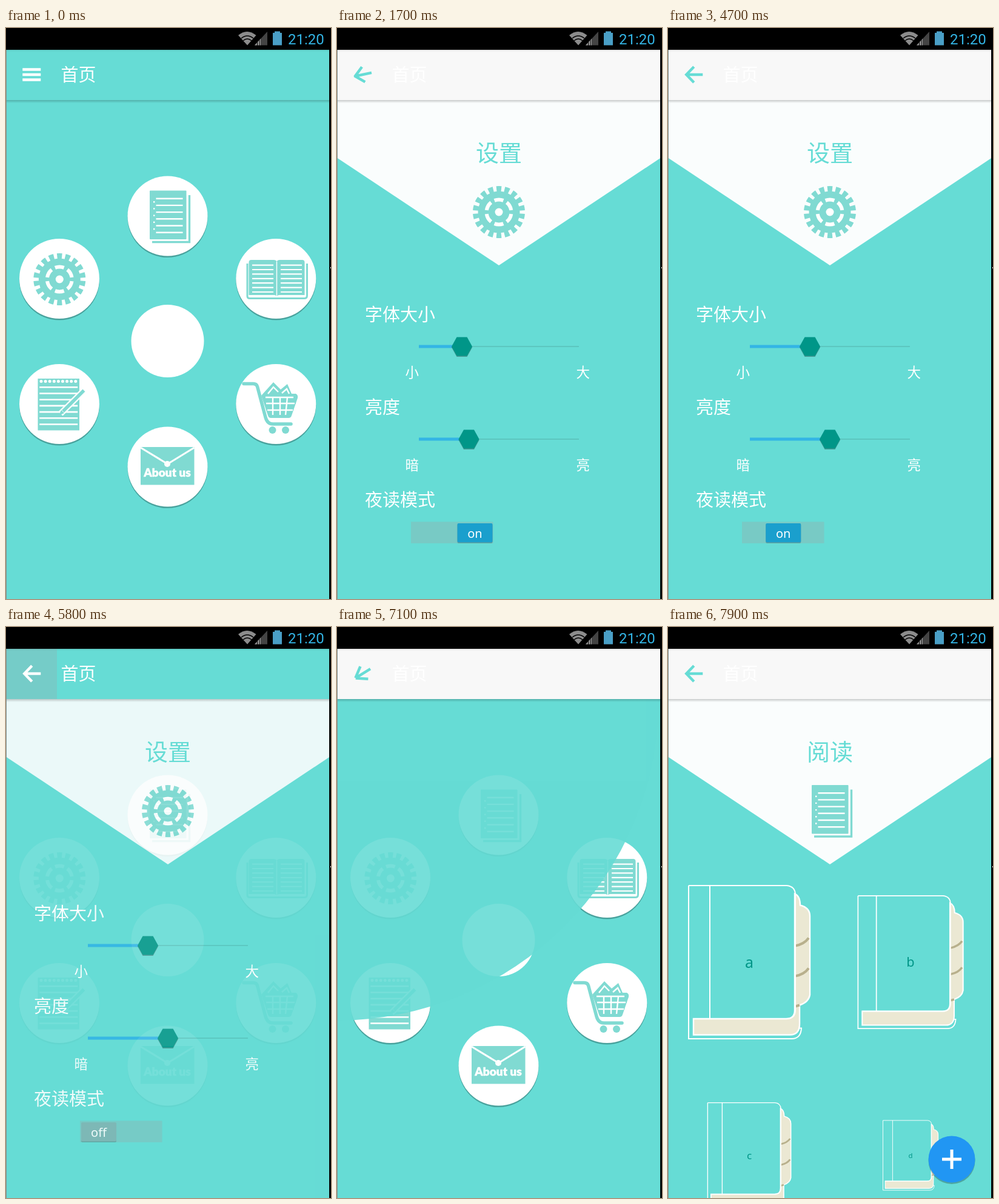
An HTML page that plays this animation: 536 px wide and 943 px high, repeating every 8 s.

```html
<!DOCTYPE html>
<html lang="zh-CN">
<head>
<meta charset="utf-8">
<title>Reader menu</title>
<style>
  html, body { margin: 0; width: 100%; height: 100%; overflow: hidden; background: #000; }
  svg { display: block; width: 100%; height: 100%; }
  text { font-family: "Noto Sans CJK SC", "Noto Sans CJK", sans-serif; fill: #fff; }
  .latin { font-family: "Noto Sans", "Open Sans", sans-serif; text-anchor: middle; }
  .label { font-size: 29px; }
  .small { font-size: 22.5px; }
  .heading { font-size: 38px; fill: #66dcd5; }
  .bg { fill: #66dcd5; }
  .ink { fill: #80dad2; }
  .ink-line { fill: none; stroke: #80dad2; }
  .white-line { fill: none; stroke: #fff; }
</style>
</head>
<body>
<svg viewBox="0 0 536 943" preserveAspectRatio="none">
  <defs>
    <linearGradient id="shade" x2="0" y2="1">
      <stop stop-color="#000" stop-opacity=".2"/>
      <stop offset="1" stop-color="#000" stop-opacity="0"/>
    </linearGradient>
    <clipPath id="reveal"><circle id="revealDisc" cx="0" cy="119"/></clipPath>

    <rect id="page" class="bg" x="1" y="36" width="532" height="907"/>
    <path id="banner" d="M1 119H533V215L267 392L1 215Z" fill="#fafdfd"/>
    <path id="hexagon" d="M-17 0L-8.5-15.5H8.5L17 0L8.5 15.5H-8.5Z"/>

    <g id="disc">
      <circle cy="2.6" r="66" fill="#49a29d"/>
      <circle r="66" fill="#fff"/>
    </g>

    <g id="gear">
      <circle class="ink" r="34.5"/>
      <circle class="ink-line" r="38" stroke-width="10" pathLength="180" stroke-dasharray="6 4" stroke-dashoffset="-2"/>
      <circle class="white-line" r="20.5" stroke-width="6" pathLength="60" stroke-dasharray="7 3" stroke-dashoffset="-1.5"/>
      <circle r="6.5" fill="#fff"/>
    </g>

    <g id="sheets">
      <rect class="ink" x="237" y="268.5" width="60.5" height="80.5" rx="1"/>
      <path class="ink-line" d="M302.5 276V353.5H241" stroke-width="3.4"/>
      <path class="white-line" d="M269.5 280.5V340" stroke-width="44" stroke-dasharray="2.4 8.8"/>
      <path class="white-line" d="M244.2 286V335" stroke-width="2.4" stroke-dasharray="2.4 8.8"/>
    </g>

    <g id="book">
      <path class="white-line" stroke-width="2" d="M-100-126.5V126.5H70Q85 126.5 86 109H83"/>
      <path fill="#ebe8d3" stroke="#fff" stroke-width="2.4" d="M75-113Q84-109 84-94Q100-90 100-76V54Q98 66 83 71V102Q83 120 67 120H-92V93.5H61Q75 93.5 75 79Z"/>
      <path fill="none" stroke="#b8b08c" stroke-width="4" d="M76-27Q91-30 98-40M76 23Q91 20 98 10M76 73L83 71"/>
      <path class="white-line" stroke-width="2" d="M-100-126.5H62Q76-125 76-111V79Q76 93.5 61 93.5H-92M-65-126.5V93.5"/>
    </g>
  </defs>

  <g id="home">
    <use href="#page"/>
    <use href="#disc" x="266.5" y="310.5"/>
    <use href="#disc" x="88" y="414"/>
    <use href="#disc" x="445.3" y="414"/>
    <use href="#disc" x="88" y="621"/>
    <use href="#disc" x="445.3" y="621"/>
    <use href="#disc" x="266.5" y="724.5"/>
    <circle cx="266.5" cy="517" r="60" fill="#fff"/>

    <use href="#sheets"/>
    <use href="#gear" x="88.3" y="415"/>

    <!-- open book -->
    <path class="ink-line" d="M398 389V443Q398 446.5 402 446.5H492Q496.500 446.500 496.500 442V389" stroke-width="3"/>
    <path class="ink" d="M400.500 387q0-4 4-4h37q4 0 5 3q1-3 5-3h37q4 0 4 4v54h-42q-3 0-4 3q-1-3-4-3h-42z"/>
    <path class="white-line" d="M446.500 386V444" stroke-width="1.4"/>
    <path class="white-line" d="M423.500 390.500V437M470.500 390.500V437" stroke-width="35" stroke-dasharray="2.200 5.200"/>

    <!-- notepad -->
    <rect class="ink" x="52.500" y="579" width="68.500" height="85.500"/>
    <path class="white-line" d="M58 583.500H117" stroke-width="5" stroke-linecap="round" stroke-dasharray="0 7.100"/>
    <path class="white-line" d="M86.700 592V660" stroke-width="63" stroke-dasharray="2.600 7.600"/>
    <path class="white-line" d="M90 637L128 599" stroke-width="10"/>
    <path class="ink-line" d="M94 633L128.500 598.500" stroke-width="5.500"/>
    <path class="ink" d="M87 640L91 631L96 636Z"/>

    <!-- cart -->
    <path class="ink-line" d="M392 587.500H408Q413 587.500 414.500 592L428 643Q431 654 440 654H470" stroke-width="5.500" stroke-linecap="round"/>
    <path class="ink" d="M421 607L441 585L453 597L464 588L471 604L478 604Q482 606 481 611L471 640Q470 644 466 644H437Q433 644 432 640Z"/>
    <path class="white-line" d="M428 610H474M429 620H476M431 631H473M440 610V639M452 610V639M464 610L461 639M432 604L441 593L449 601M455 603L463 596L467 604" stroke-width="2.400"/>
    <circle class="ink" cx="439.500" cy="664" r="6"/>
    <circle class="ink" cx="461" cy="664" r="6"/>

    <!-- envelope -->
    <rect class="ink" x="222" y="692" width="88.500" height="62.500"/>
    <path class="white-line" d="M222 693L266.500 720L310.500 693" stroke-width="3"/>
    <circle cx="266" cy="720" r="5" fill="#fff"/>
    <text x="266" y="741" text-anchor="middle" style="font:900 19px Lato,sans-serif" stroke="#fff" stroke-width=".5">About us</text>
  </g>

  <g id="settings">
    <use href="#page"/>
    <use href="#banner"/>
    <text class="heading" x="229" y="220">设置</text>
    <use href="#gear" x="267" y="304"/>
    <text class="label" x="46" y="484">字体大小</text>
    <text class="small" x="112.500" y="576.500">小</text>
    <text class="small" x="394.500" y="576.500">大</text>
    <text class="label" x="46" y="637">亮度</text>
    <text class="small" x="112.500" y="729.500">暗</text>
    <text class="small" x="394.500" y="729.500">亮</text>
    <text class="label" x="46" y="790">夜读模式</text>
    <g class="slider" transform="translate(0 526)"></g>
    <g class="slider" transform="translate(0 679)"></g>
    <rect x="122" y="815.500" width="135.500" height="35.500" fill="#78cac5"/>
    <g id="knob">
      <rect x="-29" y="819" width="58" height="32" rx="2" fill="#000" opacity=".2"/>
      <rect id="knobFace" x="-29" y="818" width="58" height="31.500" rx="2"/>
      <text id="knobText" class="latin" y="841.500" font-size="20"></text>
    </g>
  </g>

  <g id="reading" clip-path="url(#reveal)">
    <use href="#page"/>
    <g id="readingHead">
      <use href="#banner"/>
      <text class="heading" x="229" y="220">阅读</text>
      <use href="#sheets" y="-7.500"/>
    </g>
    <g id="shelf"></g>
    <g id="add">
      <circle cy="2.500" r="38.500" fill="#000" opacity=".25"/>
      <circle r="38.500" fill="#2196f3"/>
      <path class="white-line" d="M-16 0H16M0-16V16" stroke-width="5"/>
    </g>
  </g>

  <rect x="1" y="119" width="532" height="5" fill="url(#shade)"/>
  <rect id="toolbar" x="1" y="36" width="532" height="83"/>
  <rect x="1" y="36" width="532" height="3" fill="url(#shade)" opacity=".5"/>
  <rect id="press" x="1" y="36" width="83" height="83" fill="#9f9ca0"/>
  <path id="menu" fill="none" stroke-width="4.500"/>
  <text class="label" x="90.500" y="88">首页</text>

  <path d="M0 0H536V36H0ZM533 36H536V943H533Z"/>
  <path d="M0 36H1V943H0Z" fill="#7d8f8e"/>
  <path d="M535 395h1v2h-1z" fill="#fff"/>
  <path d="M398 28.500L383 12Q397.500 0 412.500 12Z" fill="#8c8c8c"/>
  <path d="M391 21Q398 15 405 21M388 17Q398 9 408 17" fill="none" stroke="#000" stroke-width="1.300"/>
  <path d="M410 28.500L431 6V28.500Z" fill="#444"/>
  <path d="M410 28.500L420 17.500V28.500Z" fill="#999"/>
  <path d="M414.500 20V29M418 17V29" stroke="#000"/>
  <path d="M440 8H443V5.500H452V8H455V28.500H440Z" fill="#4a9fc6"/>
  <text x="465" y="26.500" style="font:24px Roboto,sans-serif;fill:#33b5e5">21:20</text>
</svg>
<script>
const LOOP = 8000, STEP = 100;
const $ = id => document.getElementById(id);
const ramp = (t, start, length) => Math.min(1, Math.max(0, (t - start) / length));
const easeOut = (u, power = 2) => 1 - (1 - u) ** power;
const easeInOut = u => (1 - Math.cos(Math.PI * u)) / 2;
const mix = (a, b, u) => a + (b - a) * u;

const sliders = [...document.querySelectorAll('.slider')].map(group => {
  group.innerHTML = `<path d="M135 0H399" stroke="#58bfb9" stroke-width="1.5"/>
    <path class="fill" stroke="#33b5e5" stroke-width="5"/>
    <g class="thumb"><use href="#hexagon" y="1.5" opacity=".3"/><use href="#hexagon" fill="#009688"/></g>`;
  return x => {
    group.querySelector('.fill').setAttribute('d', `M135 0H${x}`);
    group.querySelector('.thumb').setAttribute('transform', `translate(${x} 0)`);
  };
});

const books = [
  { name: 'a', x: 134, y: 553.5, start: 7685 },
  { name: 'b', x: 400, y: 553.5, start: 7747 },
  { name: 'c', x: 134, y: 872.5, start: 7793 },
  { name: 'd', x: 400, y: 872.5, start: 7836 }
];
$('shelf').innerHTML = books.map(b =>
  `<g><use href="#book"/><text class="latin" y="9" font-size="25" style="fill:#009688">${b.name}</text></g>`).join('');
books.forEach((b, i) => b.node = $('shelf').children[i]);

// Three bars that turn into an arrow (p = 1) while rotating.
function drawMenu(p, angle, color) {
  const bar = side => `M${mix(-15, -13.5, p)} ${side * mix(8.5, -1.5, p)}L${mix(15, 0.5, p)} ${side * mix(8.5, 13, p)}`;
  $('menu').setAttribute('d', `${bar(-1)}${bar(1)}M${mix(-15, -12, p)} 0H15`);
  $('menu').setAttribute('transform', `translate(42.3 77) rotate(${angle})`);
  $('menu').setAttribute('stroke', color);
}

function render(t) {
  const closing = t >= 5800 && t < 6900;
  const light = t >= 1400 && !closing;
  const started = t < 5800 ? 1410 : closing ? 5800 : 6900;
  const turn = easeOut(ramp(t, started, 800), 6);
  drawMenu(closing ? 1 - turn : turn, closing ? 180 * turn : 180 * turn - 180, light ? '#66dcd5' : '#fff');
  $('toolbar').setAttribute('fill', light ? '#f8f8f8' : '#66dcd5');
  $('press').setAttribute('opacity', t < 5800 ? 0 : 0.25 * (1 - ramp(t, 5800, 200)));

  $('settings').setAttribute('opacity', ramp(t, 1410, 250) * (1 - ramp(t, 5775, 250)));
  sliders[0](mix(206, 234, ramp(t, 2500, 200)));
  sliders[1](mix(217.5, 267, ramp(t, 3600, 200)));
  const off = ramp(t, 4600, 200);
  $('knob').setAttribute('transform', `translate(${mix(227.5, 153, off)} 0)`);
  $('knobFace').setAttribute('fill', off < 1 ? '#1a9fcd' : '#80b5b3');
  $('knobText').textContent = off < 1 ? 'on' : 'off';

  $('reading').setAttribute('opacity', ramp(t, 6877, 250));
  $('revealDisc').setAttribute('r', 985 * easeInOut(ramp(t, 6877, 425)));
  $('readingHead').setAttribute('transform', `translate(0 ${-274 * (1 - easeInOut(ramp(t, 7295, 400)))})`);
  for (const b of books) {
    const scale = 1.02 * easeOut(ramp(t, b.start, 250));
    b.node.setAttribute('transform', `translate(${b.x} ${b.y}) scale(${scale})`);
  }
  $('add').setAttribute('transform', `translate(468 879) scale(${easeOut(ramp(t, 7650, 200))})`);
}

function tick(now) {
  render(Math.floor(now % LOOP / STEP) * STEP);
  requestAnimationFrame(tick);
}
render(0);
requestAnimationFrame(tick);
</script>
</body>
</html>
```
